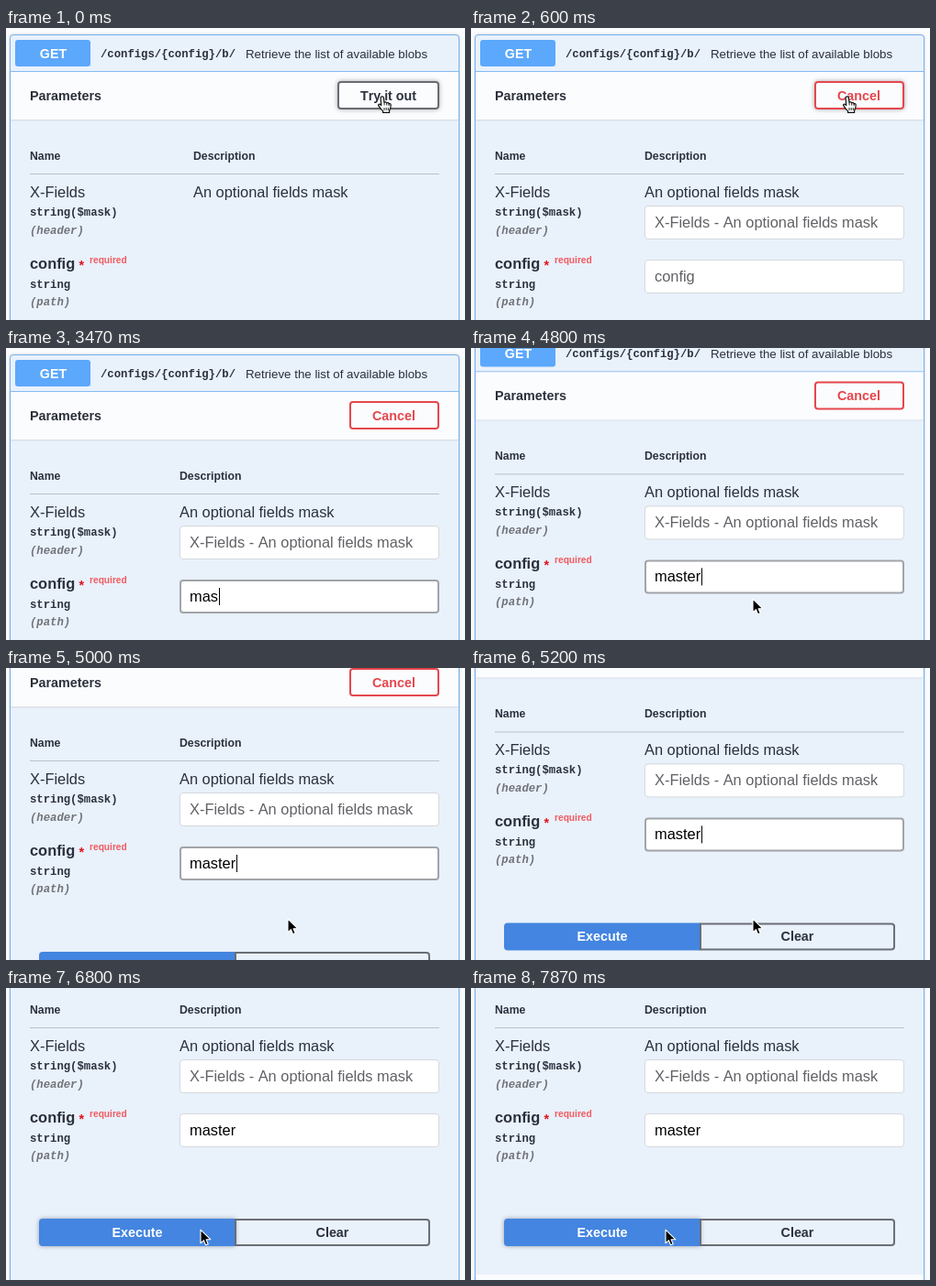
Write an HTML page that moves like this. It is 500 px wide and 319 px high and loops after 8 s.

```html
<!DOCTYPE html>
<html lang="en">
<head>
<meta charset="utf-8">
<title>Trying out an API call</title>
<style>
html, body { margin: 0; width: 100%; height: 100%; overflow: hidden; background: #fafbfc; }
#stage { position: absolute; left: 0; top: 0; width: 500px; height: 319px; overflow: hidden; }
#page { position: absolute; left: 0; top: 0; width: 500px; height: 500px; }
#page div { position: absolute; box-sizing: border-box; }
svg { position: absolute; left: 0; top: 0; overflow: visible; }
text { font-family: "Liberation Sans", Arial, sans-serif; font-kerning: none; fill: #2b303c; white-space: pre; }
.bold { font-weight: 700; }
.mono { font: 700 12.26px "Liberation Mono", "Courier New", monospace; }
.in { font-style: italic; fill: #717378; }
.hint { fill: #606165; }
.white { fill: #fff; }
.mid { text-anchor: middle; }
</style>
</head>
<body>
<div id="stage">
  <div id="page"></div>
  <svg width="500" height="319" id="pointer">
    <g id="arrow">
      <path d="M-1-.8V13.8L2.4 10.7L4.5 15.8L7.2 14.7L5.1 9.7H9.7Z" fill="#000" stroke="#fff" stroke-width="1.1" stroke-linejoin="round"/>
    </g>
    <g id="hand">
      <path d="M-1.9 1.6C-1.9-.6 1.3-.6 1.5 1.4L2 6.4C2.6 5.4 4.4 5.6 4.6 7C5.4 6.1 6.9 6.5 7.1 7.8C8.2 7.2 9.3 8 9.2 9.4C9.2 12 8.8 13.4 7.6 15.2V17.4H.6V15.6C-1.2 14.2-3 11.8-4.3 9.6C-4.8 8.2-3 7.6-2 8.8L-1.2 9.6Z" fill="#fff" stroke="#111" stroke-width="1.2" stroke-linejoin="round"/>
      <path d="M2.1 6.6V9.4M4.7 7.2V9.6M7.1 8V10M2 12V15M4.2 12V15M6.3 12V15" fill="none" stroke="#111" stroke-width=".9"/>
    </g>
    <g id="beam" fill="none" stroke-linecap="round">
      <path d="M-2.8-8Q0-8 0-6.2Q0-8 2.8-8M0-6.2V6.2M-2.8 8Q0 8 0 6.2Q0 8 2.8 8M-1.6 3H1.6" stroke="#fff" stroke-width="2.4"/>
      <path d="M-2.8-8Q0-8 0-6.2Q0-8 2.8-8M0-6.2V6.2M-2.8 8Q0 8 0 6.2Q0 8 2.8 8M-1.6 3H1.6" stroke="#111" stroke-width="1.3"/>
    </g>
  </svg>
</div>
<script>
const LOOP = 8000;
const OPEN = 200, FOCUS = 1800, BLUR = 6600;
const GREY = [104, 107, 114], RED = [228, 71, 77];
const page = document.getElementById('page');

function box(x, y, w, h, css) {
  const el = document.createElement('div');
  el.style.cssText = `left:${x}px;top:${y}px;width:${w}px;height:${h}px;${css}`;
  page.append(el);
  return el;
}

// Panel
box(4, 7, 490, 600, 'border:1px solid #74b2f3;border-radius:4px;background:#e9f1fb;box-shadow:0 0 3px rgba(0,0,0,.19)');
box(5, 47, 488, 1, 'background:#84bbf3');
box(5, 48, 488, 52, 'background:#fbfcfe;box-shadow:0 1px 2px rgba(0,0,0,.1)');
box(10, 13, 82, 29, 'border-radius:3px;background:#5ba8fc');
box(26, 159, 446, 1, 'background:#b9c1cc');
const footer = box(5, 429, 488, 60, 'background:#fbfcfe;box-shadow:0 1px 2px rgba(0,0,0,.1)');

// Controls
const field = 'border:1px solid #d5d8db;border-radius:4px;background:#fff';
const mask = box(189, 194, 283, 37, field);
const config = box(189, 253, 283, 37, field);
const toggle = box(361, 58, 111, 31, 'border:2px solid;border-radius:4px');
const execute = box(36, 368, 214, 30, 'border-radius:4px 0 0 4px;background:#4385e0');
const clear = box(249, 368, 213, 30, 'border:2px solid #6a6e77;border-radius:0 4px 4px 0');

const NS = 'http://www.w3.org/2000/svg';
const layer = document.createElementNS(NS, 'svg');
layer.setAttribute('width', 500);
layer.setAttribute('height', 500);
page.append(layer);

function label(x, y, size, str, cls = '') {
  const el = document.createElementNS(NS, 'text');
  el.setAttribute('x', x);
  el.setAttribute('y', y);
  el.setAttribute('class', cls);
  if (size) el.setAttribute('font-size', size);
  el.textContent = str;
  layer.append(el);
  return el;
}

label(51.5, 33, 14.3, 'GET', 'bold white mid');
label(103, 32, 0, '/configs/{config}/b/', 'mono');
label(261, 32.5, 13.3, 'Retrieve the list of available blobs');
label(26, 79, 14.3, 'Parameters', 'bold');
label(26, 144, 12.26, 'Name', 'bold');
label(26, 185, 16.4, 'X-Fields');
label(26, 205, 0, 'string($mask)', 'mono');
label(26, 225, 0, '(header)', 'mono in');
label(26, 262.6, 16.4, 'config', 'bold');
label(79.5, 264, 14.3, '*', 'bold').style.fill = '#e0141c';
label(91, 256.5, 10.2, 'required', 'bold').style.fill = '#f25a60';
label(26, 284, 0, 'string', 'mono');
label(26, 303, 0, '(path)', 'mono in');
label(143, 388, 14.3, 'Execute', 'bold white mid');
label(355.5, 388, 14.3, 'Clear', 'bold mid');

const heads = [label(204, 144, 12.26, 'Description', 'bold'), label(204, 185, 16.4, 'An optional fields mask')];
const tryText = label(416.5, 79, 14.3, 'Try it out', 'bold mid');
const cancelText = label(422.5, 79, 14.3, 'Cancel', 'bold mid');
const maskHint = label(200, 218, 16.4, 'X-Fields - An optional fields mask', 'hint');
const configHint = label(200, 277, 16.4, 'config', 'hint');
const typed = label(200, 277, 16.4, '');
typed.style.fill = '#000';
const caret = box(200, 262, 1.3, 19, 'background:#000');

// Motion tables: time, value(s)
const SCROLL = [[4670, 0], [4800, 21.6], [5000, 58], [5200, 89.6], [5400, 116]];
const MOVES = [
  [800, 410, 75], [1035, 390, 112], [1335, 341, 220], [1670, 313, 276],
  [4390, 313, 276], [4400, 308, 275], [5530, 308, 275],
  [5670, 304, 275], [5870, 288, 275], [6200, 238, 268], [6400, 213, 265]
];
const KEYS = [[2800, 'm'], [3270, 'a'], [3470, 's'], [3670, 't'], [3870, 'e'], [4070, 'r']];
const WIDTH = { m: .833, a: .556, s: .5, t: .278, e: .556, r: .333 };

const ramp = (t, a, b) => Math.min(1, Math.max(0, (t - a) / (b - a)));
const mix = (a, b, p) => a + (b - a) * p;

function sample(table, t, col = 1) {
  let prev = table[0];
  for (const row of table) {
    if (t < row[0]) return mix(prev[col], row[col], ramp(t, prev[0], row[0]));
    prev = row;
  }
  return prev[col];
}

const show = (el, on) => { el.style.visibility = on ? 'visible' : 'hidden'; };
const glow = (el, p) => { el.style.boxShadow = `0 0 5px rgba(0,0,0,${.34 * p})`; };

function drawPointer(t, scroll) {
  const x = sample(MOVES, t, 1), y = sample(MOVES, t, 2), py = y + scroll;
  const visible = t < KEYS[0][0] || t >= 4400;
  const onToggle = x > (t < OPEN ? 361 : 374) && py > 58 && py < 89;
  const onField = t >= OPEN && x > 189 && x < 472 && ((py > 194 && py < 231) || (py > 253 && py < 290));
  const kind = onToggle ? 'hand' : onField ? 'beam' : 'arrow';
  for (const id of ['arrow', 'hand', 'beam']) {
    const el = document.getElementById(id);
    show(el, visible && id === kind);
    el.setAttribute('transform', `translate(${x} ${y})`);
  }
}

function render(t) {
  const scroll = sample(SCROLL, t);
  const open = t >= OPEN;
  page.style.transform = `translateY(${-scroll}px)`;

  heads.forEach(el => el.setAttribute('x', open ? 189 : 204));
  [mask, config, maskHint, cancelText].forEach(el => show(el, open));
  show(tryText, !open);

  const tint = GREY.map((c, i) => Math.round(mix(c, RED[i], ramp(t, OPEN - 70, OPEN + 270))));
  toggle.style.left = (open ? 374 : 361) + 'px';
  toggle.style.width = (open ? 98 : 111) + 'px';
  toggle.style.borderColor = cancelText.style.fill = `rgb(${tint})`;
  glow(toggle, 1 - ramp(t, 1000, 1330));
  glow(clear, ramp(t, 5230, 5530) - ramp(t, 6130, 6430));
  glow(execute, ramp(t, 6130, 6430));

  const focused = t >= FOCUS && t < BLUR;
  config.style.border = focused ? '2px solid #a2a4a8' : '1px solid #d5d8db';

  const word = KEYS.filter(k => t >= k[0]).map(k => k[1]).join('');
  typed.textContent = word;
  show(configHint, open && !word);
  show(caret, focused && !(t >= 2470 && t < 2800));
  caret.style.left = 200.7 + 16.4 * [...word].reduce((w, c) => w + WIDTH[c], 0) + 'px';

  // The response header is pushed away while the request is loading
  show(footer, t < 6600 || t >= 7200);
  drawPointer(t, scroll);
}

const start = performance.now();
function tick() {
  const t = (performance.now() - start) % LOOP;
  // Steps alternate between 70 and 130 ms
  const part = t % 200;
  render(t - part + (part >= 70 ? 70 : 0));
  requestAnimationFrame(tick);
}
tick();
</script>
</body>
</html>
```
